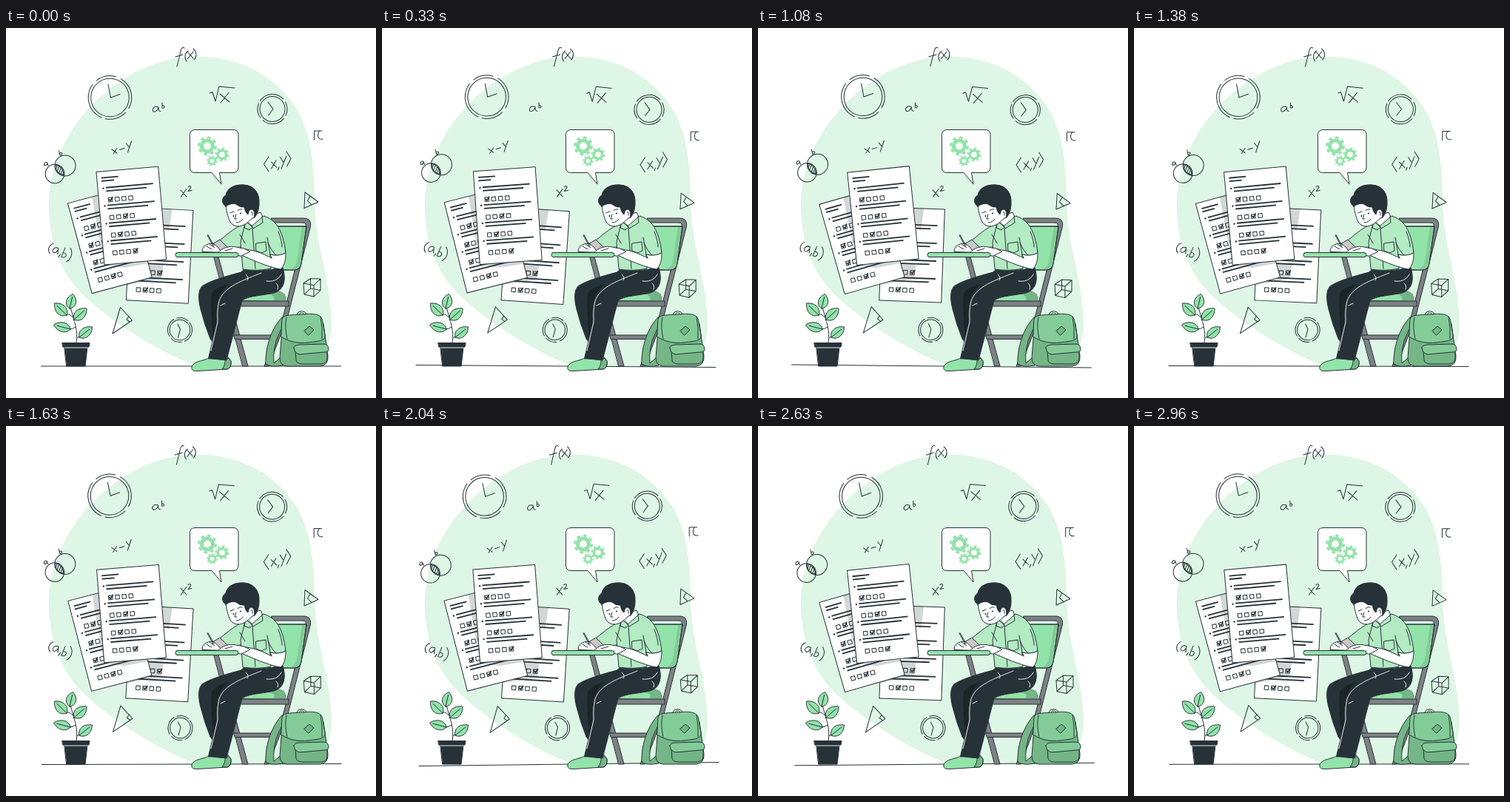
An HTML page that plays this animation: 500x500 px, repeating every 3 s.

```html
<!DOCTYPE html>
<html lang="en">
<head>
<meta charset="utf-8">
<title>Taking an exam</title>
<style>
  html, body { margin: 0; width: 100%; height: 100%; overflow: hidden; background: #fff; }
  svg { display: block; width: 100vw; height: 100vh; }
  .ink { fill: none; stroke: #263238; stroke-width: 1; stroke-linecap: round; stroke-linejoin: round; }
  .line { stroke: #263238; stroke-width: 1; stroke-linejoin: round; stroke-linecap: round; }
  .green { fill: #92e3a9; }
  .pale { fill: #b3ebc3; }
  .mid { fill: #83cc98; }
  .deep { fill: #75b687; }
  .dark { fill: #263238; }
  .darker { fill: #1b2427; }
  .white { fill: #fff; }
  .grey { fill: #7d8183; }
  .shade { fill: #c9c9c9; }
  .none { fill: none; }
  .seam { fill: none; stroke: #fff; stroke-width: .9; stroke-linecap: round; }
</style>
</head>
<body>
<svg id="stage" viewBox="0 0 500 500" xmlns="http://www.w3.org/2000/svg"></svg>
<script>
const path = (d, cls = 'ink') => `<path class="${cls}" d="${d}"/>`;
const fill = (color, d) => path(d, 'line ' + color);
const circle = (x, y, r, cls = 'ink', extra = '') =>
  `<circle class="${cls}" cx="${x}" cy="${y}" r="${r}" ${extra}/>`;

const clock = (x, y, outer, inner, hands, turn) =>
  circle(x, y, inner) + path(hands) +
  circle(x, y, outer, 'ink', `pathLength="100" stroke-dasharray="25 4 16 3 29 4 15 4" transform="rotate(${turn} ${x} ${y})"`);

const gear = (x, y, r, hole, teeth = 8) => {
  const tooth = r * 0.24, body = r - tooth;
  const ring = (radius, width, dash) =>
    circle(x, y, radius, 'none', `stroke="#92e3a9" stroke-width="${width}" ${dash}`);
  return ring((body + hole) / 2, body - hole + 0.3, '') +
    ring(r - tooth / 2, tooth, `pathLength="${teeth * 2}" stroke-dasharray="1"`);
};

const leaf = (x, y, tipX, tipY, bulge) => {
  const dx = tipX - x, dy = tipY - y;
  const at = (along, side) =>
    `${x + dx * along - dy * side * bulge} ${y + dy * along + dx * side * bulge}`;
  return fill('green', `M${x} ${y}C${at(0.15, 1)} ${at(0.65, 1.1)} ${tipX} ${tipY}C${at(0.65, -1.1)} ${at(0.15, -1)} ${x} ${y}Z`) +
    path(`M${x} ${y}L${at(0.8, 0)}`);
};

// A sheet with a title and four questions; checks holds the ticked box of each.
const SHEET_W = 84, SHEET_H = 126;
const sheet = (x, y, angle, checks) => {
  const bar = (x1, x2, y) => `M${x1} ${y}H${x2}`;
  let bars = bar(6, 29, 8.6) + bar(6, 23, 13), boxes = '', ticks = '', dots = '';
  checks.forEach((checked, q) => {
    const top = 22.3 + q * 24;
    bars += bar(11, 75, top) + bar(11, 66, top + 4.7);
    dots += circle(7.5, top + 0.6, 1.2, 'dark');
    for (let i = 0; i < 4; i++) {
      const bx = 13 + i * 9.2, by = top + 14;
      boxes += `M${bx} ${by}h5.4v5.4h-5.4z`;
      if (i === checked) ticks += `M${bx + 1.1} ${by + 2.4}l1.6 1.8l3.2-4.6`;
    }
  });
  return `<g transform="translate(${x} ${y}) rotate(${angle})">
    <rect class="line white" width="${SHEET_W}" height="${SHEET_H}"/>
    <path d="${bars}" stroke="#263238" stroke-width="1.8"/>${dots}
    ${path(boxes)}<path class="ink" style="stroke-width:1.7" d="${ticks}"/></g>`;
};

const sheetShade = (id, x, y, angle, d) =>
  `<clipPath id="${id}"><rect width="${SHEET_W}" height="${SHEET_H}" transform="translate(${x} ${y}) rotate(${angle})"/></clipPath>
  <path clip-path="url(#${id})" d="${d}" fill="#263238" fill-opacity=".2"/>`;

const backdrop = `<path fill="#def6e5" d="M258 457C214 441 150 403 110 366C75 335 57 290 58 235
  C59 190 80 140 120 100C160 62 205 39 258 38.500C315 38 365 65 393 110C416 150 416 195 417.500 245
  C420 300 440 347 440 402C439 430 425 450 408 457Z"/>`;

const symbols = [
  clock(140.5, 94, 29.3, 25.8, 'M138 76L141.5 94L154 89.5', -60),
  clock(360, 109.5, 20, 17, 'M354 100L361 109.5L354.5 118', 40),
  clock(235, 408, 16.5, 13.8, 'M232 400L235.5 407L232.5 418', 150),
  path('M241 27C236 24 236 34 234 40L231 52M229 39L239 36'),
  path('M246 31C241 35 241 41 244 45M246 33L253 41M253 32L245.5 41.5M253 28C258 32 258 39 254 43'),
  path('M206 107C200 104 196 111 199.5 113C203 114 206 109 206 107C206 111 207 113 209 112.5M211 101V108C215 109 215 104 211 105'),
  path('M275.5 88L279 86.5L283 99L288 79L309 81M289 89L302 100M301 87.5L290 101'),
  path('M416.500 151V139H427M424 139C420 143 421 152 428 150'),
  path('M143 164L150 169M150 162.5L145 170M153.5 164.5L160 162.5M162.5 156L166.5 161M169.5 153L164.5 168'),
  circle(66, 197, 12.8), circle(80, 186, 14),
  path('M67 185Q77 187 78.5 199Q69 197 66.5 189Z'),
  path('M69 186L67.5 191M72 186.5L69 194M74.5 188.5L71.5 196.5M76.5 191.5L74 198M78 195L76.5 199'),
  path('M55.5 182C52 180 50.5 185 52.5 186C55 186 56 183 55.5 182L57 186M71.5 165.5L73 172C77 172 77 167 72.5 169'),
  path('M236 219L244 228M244 217.5L236.5 228M246 215C248 212 251 214 249 217L246 220.5L251 219.5'),
  path('M355 174L348.5 184L355 194M358.5 181L366 188.5M365 179L358.5 190M369 188L367.5 192M370.5 174.5L374.5 181M379 173L372 190M379 167L385 176.5L379.5 187'),
  `<g transform="rotate(10 73 302)">${path('M62 293C56 297 56 303 60 307M70 298C64 296 61 303 64.5 305C68 306 71 300 70 298L70.5 306M74 306L72 310M79 296L76 309C83 311 84 302 78 303M86 295C91 301 90 309 84 314')}</g>`,
  path('M404 222L403 243.5L422 235ZM410.5 228L407.5 233.5L413 239'),
  path('M402 345L416 347.5V363L403 360ZM411.5 338.5L425 339V354.5L411.5 352ZM402 345L411.5 338.5M416 347.5L425 339M416 363L425 354.5M403 360L411.5 352'),
  path('M154.5 377.5L144 413L170.5 395ZM166 389.5L163 394L167 397'),
  path('M47.5 457H452.5')
].join('');

const papers =
  sheet(169, 242, 3, [0, 2, 3, 1]) +
  sheetShade('underRight', 169, 242, 3, 'M208 243H225L220 275L213 268ZM160 348L210 339L213 320L150 312Z') +
  sheet(83.5, 237, -15, [1, 0, 0, 2]) +
  sheetShade('underLeft', 83.5, 237, -15, 'M115 222L126 222L134 316L194 310L198 317L160 324L133 321Z') +
  sheet(122, 194.5, -5, [0, 2, 1, 3]);

const plant = [
  path('M95 426C98 408 92 397 87 377M90 391Q87 386 82 387M94 404Q90 407 86 407M97 419Q95 418 99 417M91 395L93 392'),
  leaf(86, 379, 90.5, 359.5, 0.42), leaf(82, 388, 65.5, 372, 0.38),
  leaf(92, 394, 109, 379, 0.38), leaf(87, 407, 64.5, 401, 0.34), leaf(99, 418, 116.5, 404, 0.36),
  fill('dark', 'M76 425.5H113L112 431H77ZM79 431H110L107 457H82Z'),
  path('M79 432H110', 'seam')
].join('');

const bubble =
  fill('white', 'M255.5 137.5H307Q314 137.5 314 144.5V188Q314 195.5 307 195.5H288.5L291 211L278 195.5H255.5Q248.5 195.5 248.5 188V144.5Q248.5 137.5 255.5 137.5Z') +
  gear(272, 159.5, 13, 5.2) + gear(292, 171, 9.5, 4) + gear(278.5, 179.5, 7.2, 3);

const chair = [
  fill('grey', 'M281 309L287 309L327 457L320 457Z'),
  fill('grey', 'M308 415H366V420.5H309.5Z'),
  fill('grey', 'M359 257H402Q413 257 411.5 268L381 389L355 457H349L375 388L405 268Q406 263 401 263H359Z'),
  fill('green', 'M366 268H406L399 318Q398 327 389 327H372Z'),
  path('M400 269H405L398.5 318Q397 327 388 327H381Q392 324 393 315Z', 'mid'),
  path('M366 268H406L399 318Q398 327 389 327H372'),
  fill('green', 'M300 368Q300 361 308 359L368 356Q380 358 377 369Z'),
  path('M352 358L368 356Q380 358 377 369H360Q368 363 352 358Z', 'deep'),
  fill('grey', 'M283 369H382V376H283Z')
].join('');

const legs = [
  fill('green', 'M272 447C266 450 255 450 251 457C250 462 253 464 259 463.5L299 461Q305 459 304 450L301 446Z'),
  fill('deep', 'M296 447L301 446L304 450Q305 459 299 461L292 461Q297 455 296 447Z'),
  fill('dark', 'M330 327C305 333 276 341 265 349C259 355 260 368 263 380Q268 400 276 420L285 432L305 365Z'),
  path('M322 341C300 346 280 350 278 360C276 375 278 396 280 416L292 400L300 362Z', 'darker'),
  fill('dark', 'M321 327L374 324C379 340 376 354 362 358C346 362 330 361 319 368L298 449L273.5 446.5L285 398C283 373 288 360 297 350Z'),
  path('M345 331C320 341 294 350 288 369C285 381 286 389 286 397L277 436M372 333C368 341 360 343 352 342M324 333Q329 337 326 341M365 345Q369 348 367 353M290 375L296 372', 'seam')
].join('');

const torso = [
  fill('white', 'M325 255L344 249L348 258L333 270L323 264Z'),
  fill('pale', 'M325 262L321 265C310 269 300 278 289 287L298 298L317 296L322 327Q345 330 372 324L374 300Z'),
  fill('pale', 'M324 261L332 268L348 254C364 259 374 271 378 304Q369 309 357 306L358 325Q340 329 320 326L317 290Z'),
  path('M346 255L347 263L334 271L332 268M324 261L322 270L329 273L333 269M333 271L337 325M357 306L353 283M354 290Q359 302 365 307M338 291L351 289L352 301L345 304L338 301ZM316 279L323 291M368 275Q373 288 373 296'),
  fill('white', 'M357 306Q368 309 378 304C378 314 376 322 371 326C354 323 331 313 314 305L312 298C331 298 346 304 359 311Z')
].join('');

const desk = [
  fill('shade', 'M279 292L289 286L299 296L290 301Z'),
  fill('white', 'M265 302C265 295 271 291 280 291L288 298L291 303Z'),
  path('M271 295L278 299M275 292L282 297'),
  fill('white', 'M287 303C292 297 302 294 311 296Q322 297 330 302L318 308Z'),
  path('M296 301L306 298'),
  path('M272 280L280 295M273 279.5L281 294', 'line none'),
  fill('green', 'M231 303.5H311Q314 303.5 314 306.5T311 309.5H231Q229 309.5 229 306.5T231 303.5Z')
].join('');

const head = [
  fill('white', 'M297 237C297 245 300 256 303 262C307 269 317 270 325 264L333 257C340 255 339 245 332 244L326 232Z'),
  fill('dark', 'M297 241C291 238 291 229 297 226C299 215 311 211 322 212C336 213 343 224 342 237C342 246 339 253 335 257C337 250 335 245 331 245C328 246 328 249 327 252Q323 249 322 242Q316 243 311 238Q304 236 297 241Z'),
  circle(307.5, 254, 1.1, 'dark'), circle(317, 250.5, 1.1, 'dark'),
  path('M303 250L308 248M313 246.5Q316 244 319 245M311 252L309 258L312 258M311 263Q317 263 320 258M331 249Q334 248 333 253')
].join('');

const bag = [
  fill('deep', 'M373 391C360 404 350 430 351 454Q358 459 374 456L377 440L362 453C360 433 367 413 376 401Z'),
  path('M393 388C393 381 405 381 406 387M396 387C397 384 402 384 403 387'),
  fill('deep', 'M374 394L370 446Q370 456 380 457H424Q436 456 435 443L429 400Z'),
  fill('mid', 'M373 394C374 387 385 388 400 387C418 385 427 387 428 397L431 415C432 423 422 423 409 425C394 427 380 423 372 417Z'),
  path('M379 391Q376 404 380 420M425 390Q428 405 427 420'),
  fill('deep', 'M403 409L410 403L416 408L409 415Z'),
  fill('deep', 'M391 436L392 449Q393 454 401 454H426Q434 453 434 446V434Z'),
  fill('mid', 'M389 432Q390 428 397 428L430 427Q436 428 436 434Q436 438 430 438L397 441Q390 440 389 432Z')
].join('');

document.getElementById('stage').innerHTML =
  backdrop + `<g id="symbols">${symbols}</g><g id="papers">${papers}</g>` +
  plant + bubble + chair + legs + torso + desk + head + bag;

// Linear sway in degrees: 0, 1 at a quarter, -1 at three quarters, 0.
const sway = (ms, period) => {
  const p = (ms % period) / period;
  return p < 0.25 ? p * 4 : p < 0.75 ? 2 - p * 4 : p * 4 - 4;
};

const symbolsGroup = document.getElementById('symbols');
const papersGroup = document.getElementById('papers');
const start = performance.now();

function render(ms) {
  symbolsGroup.setAttribute('transform', `rotate(${sway(ms, 3000)} 250 242)`);
  papersGroup.setAttribute('transform', `rotate(${sway(ms, 1500)} 168 279)`);
}

function tick() {
  render(performance.now() - start);
  requestAnimationFrame(tick);
}
tick();
</script>
</body>
</html>
```
